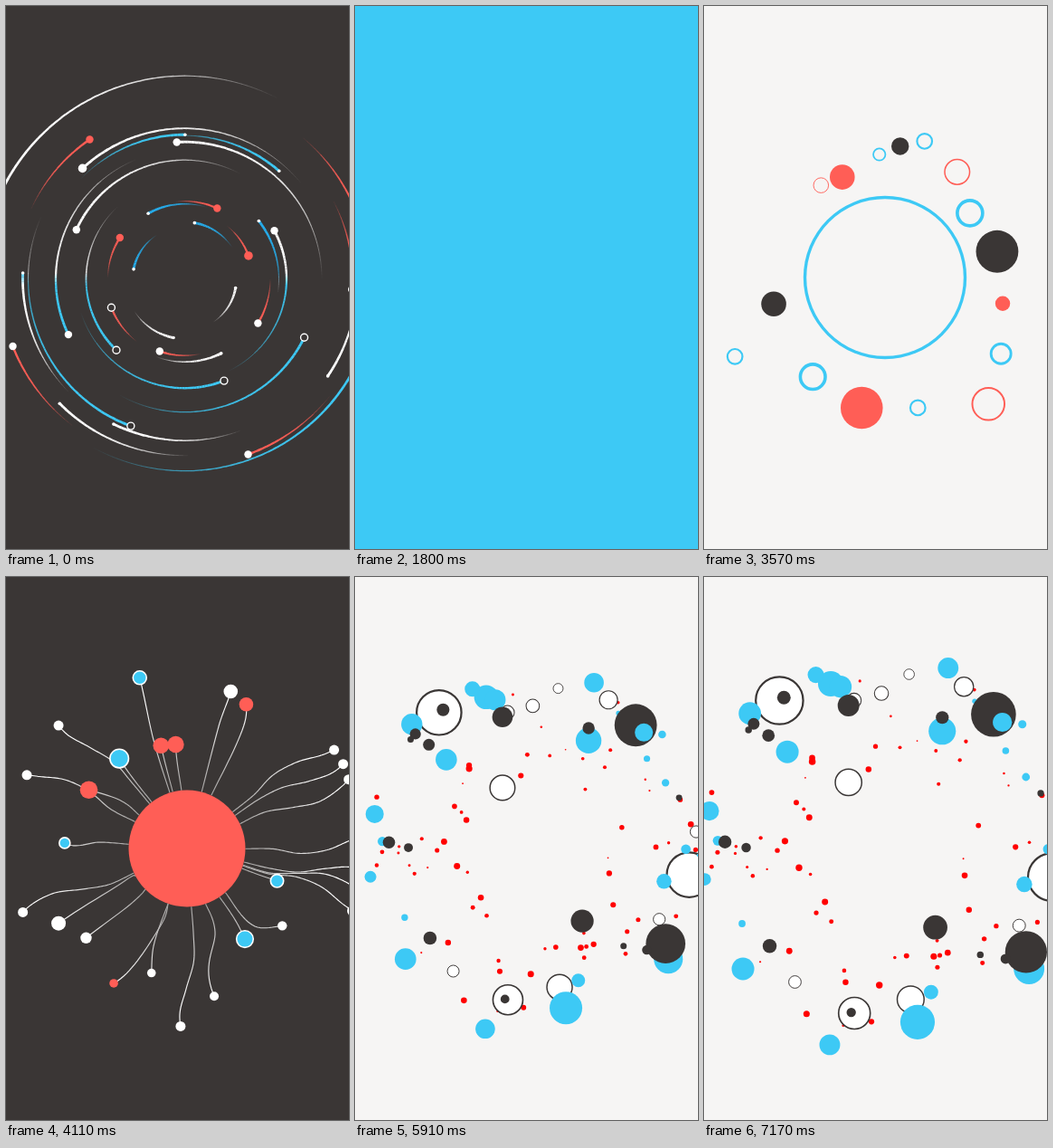
These frames come from a looping animation (379 px wide and 600 px high, 7.2 s). An HTML page with a canvas:

```html
<!DOCTYPE html>
<html lang="en">
<head>
<meta charset="utf-8">
<title>Orbits</title>
<style>
  html, body { margin: 0; width: 100%; height: 100%; overflow: hidden; background: #3a3635; }
  canvas { display: block; width: 379px; height: 600px; }
</style>
</head>
<body>
<canvas id="stage"></canvas>
<script>
const W = 379, H = 600, LOOP = 7200;
const DARK = '#3a3635', LIGHT = '#f6f5f4', BLUE = '#3dc9f5', DEEP = '#25aeee', RED = '#ff5e56', WHITE = '#fff';
const CX = 200, CY = 300, COVER = 365, CORE = 64.5;

const canvas = document.getElementById('stage');
const ctx = canvas.getContext('2d');
const dpr = window.devicePixelRatio || 1;
canvas.width = W * dpr;
canvas.height = H * dpr;
ctx.scale(dpr, dpr);
ctx.lineJoin = 'round';

const rad = deg => deg * Math.PI / 180;
const clamp = v => Math.min(1, Math.max(0, v));
const span = (t, a, b) => clamp((t - a) / (b - a));
const mix = (a, b, u) => a + (b - a) * u;
const polar = (x, y, r, a) => [x + r * Math.cos(a), y + r * Math.sin(a)];
const outQuad = u => 1 - (1 - u) ** 2;
const outCubic = u => 1 - (1 - u) ** 3;
const inCubic = u => u ** 3;
const inOut = u => u * u * (3 - 2 * u);
const outBack = u => 1 + 2.4 * (u - 1) ** 3 + 1.4 * (u - 1) ** 2;

let seed = 11;
const random = (a = 0, b = 1) => {
  seed = seed * 16807 % 2147483647;
  return mix(a, b, seed / 2147483647);
};

function fillAll(color) {
  ctx.fillStyle = color;
  ctx.fillRect(0, 0, W, H);
}

function disc(x, y, r, fill, stroke, width) {
  if (r <= 0) return;
  ctx.beginPath();
  ctx.arc(x, y, r, 0, 7);
  if (fill) { ctx.fillStyle = fill; ctx.fill(); }
  if (stroke) { ctx.strokeStyle = stroke; ctx.lineWidth = width; ctx.stroke(); }
}

/* ---- Orbiting arcs ---- */
const OX = 197.5, OY = 301.7, FAST = 108.4 / 810, SLOW = 92.5 / 810;

function halves(top, bottom) {
  const g = ctx.createLinearGradient(0, OY - 7, 0, OY + 7);
  g.addColorStop(0, top);
  g.addColorStop(1, bottom);
  return g;
}

// Each start is a radius and head angle; every nth head, from the second on, is hollow below the middle.
const orbits = [
  { speed: FAST, trail: -46, width: 2.9, paint: halves(BLUE, WHITE),
    starts: [[159.5, 270], [158.5, 311], [191, 34], [178.5, 116], [195, 135], [179, 182]] },
  { speed: -SLOW, trail: 46, width: 2.9, paint: halves(DEEP, WHITE),
    starts: [[104, 322], [63, 280], [83, 241], [57.5, 191], [66, 101], [91.5, 64], [57, 10]] },
  { speed: -FAST, trail: 93, width: 2.9, paint: halves(WHITE, BLUE), head: WHITE, nth: 2,
    starts: [[224.5, 204], [166.5, 227.4], [151.5, 266.8], [109, 134], [142.5, 154.6], [147, 26.2],
      [131.5, 204.6], [120.5, 69], [112.5, 331.8], [173, 110.3], [212, 25.3]] },
  { speed: FAST, trail: -31, width: 2.5, paint: RED, head: RED, nth: 4,
    starts: [[186.5, 235.6], [185.5, 3.4], [203.5, 341], [206, 70], [204, 158.5], [75, 339.8],
      [94.5, 31], [86, 294.5], [85, 212.4], [87, 158.6], [84.5, 109]] }
];

function tail(r, from, sweep, width, paint) {
  const n = Math.ceil(Math.abs(sweep) / 1.5), step = rad(sweep) / n, start = rad(from);
  ctx.strokeStyle = paint;
  for (let i = 0; i < n; i++) {
    const u = i / n, a = start + i * step, b = a + step * 1.04;
    ctx.globalAlpha = 1 - u ** 3;
    ctx.lineWidth = mix(width, 0.5, u);
    ctx.beginPath();
    ctx.arc(OX, OY, r, Math.min(a, b), Math.max(a, b));
    ctx.stroke();
  }
  ctx.globalAlpha = 1;
}

function head(x, y, color, hollow) {
  if (!color) return disc(x, y, 1.8, WHITE);
  const upper = clamp((OY + 5 - y) / 10);
  if (upper < 1) {
    if (hollow) disc(x, y, 4, DARK, WHITE, 1.4);
    else disc(x, y, 4.2, WHITE);
  }
  ctx.globalAlpha = upper;
  if (upper > 0) disc(x, y, hollow ? 4.8 : 4.2, color);
  ctx.globalAlpha = 1;
}

function drawOrbits(t) {
  fillAll(DARK);
  const heads = [];
  for (const o of orbits) {
    o.starts.forEach(([r, angle], i) => {
      const a = angle + o.speed * t;
      tail(r, a, o.trail, o.width, o.paint);
      heads.push([...polar(OX, OY, r, rad(a)), o.head, i % o.nth === 1]);
    });
  }
  heads.forEach(h => head(...h));
  disc(CX, CY, COVER * inCubic(span(t, 1530, 1790)), BLUE);
}

/* ---- Circles around a ring ---- */
// Places are x, y, radius; line is the stroke relative to the radius, 0 for solid.
const satellites = [
  { color: BLUE, line: 0.26, places: [[194, 164, 6.7], [244, 149.5, 8.3], [294, 229, 14], [328, 384.5, 11],
    [236, 444, 8.3], [120, 409.5, 13.8], [34, 387, 8.3]] },
  { color: RED, line: 0.11, places: [[280, 183.5, 13.8], [314, 440, 17.8], [129.5, 198, 8.3]] },
  { color: RED, line: 0, places: [[330, 329, 8.2], [174, 444, 23.3], [153, 189, 13.8]] },
  { color: DARK, line: 0, places: [[217, 155, 9.7], [324, 271.5, 23.4], [77, 329, 13.8]] }
];

function drawRing(t) {
  fillAll(LIGHT);
  const grow = outCubic(span(t, 1980, 2420));
  const reach = grow * mix(1.25, 1, inOut(span(t, 2420, 3570)));
  const turn = rad(0.11 * (3570 - t));
  for (const { color, line, places } of satellites) {
    for (const [x, y, size] of places) {
      const d = Math.hypot(x - CX, y - CY) * reach, r = size * grow;
      const [px, py] = polar(CX, CY, d, Math.atan2(y - CY, x - CX) + turn);
      if (line) disc(px, py, r, null, color, r * line);
      else disc(px, py, r, color);
    }
  }
  disc(CX, CY, mix(COVER, 90.2, inOut(span(t, 1860, 2160))), BLUE);
  disc(CX, CY, 86.8 * outCubic(span(t, 2080, 2300)), LIGHT);
  disc(CX, CY, COVER * inOut(span(t, 3580, 3740)), DARK);
}

/* ---- Growing strands ---- */
const strands = [];
const strandInk = ctx.createRadialGradient(CX, CY, CORE, CX, CY, 170);
strandInk.addColorStop(0, '#a5a3a2');
strandInk.addColorStop(1, WHITE);

// Smooth curve from the core through the given points, sampled once.
function strand(color, r, ...points) {
  const [x, y] = points[0];
  const p = [polar(CX, CY, CORE, Math.atan2(y - CY, x - CX)), ...points];
  const at = i => p[Math.min(p.length - 1, Math.max(0, i))];
  const spline = (a, b, c, d, u) =>
    b + 0.5 * u * (c - a + u * (2 * a - 5 * b + 4 * c - d + u * (3 * (b - c) + d - a)));
  const path = [];
  let length = 0;
  for (let i = 0; i < p.length - 1; i++) {
    for (let k = 0; k <= 16; k++) {
      const q = [0, 1].map(n => spline(at(i - 1)[n], at(i)[n], at(i + 1)[n], at(i + 2)[n], k / 16));
      const last = path[path.length - 1];
      if (last) length += Math.hypot(q[0] - last.x, q[1] - last.y);
      path.push({ x: q[0], y: q[1], s: length });
    }
  }
  strands.push({ path, length, color, r });
}

// Rippling strands that run off the stage.
[-37, -31, -23, -1, 10, 14, 18, 89, 158, 207, 227].forEach((angle, i) => {
  const points = [];
  for (let d = 95; d < 350; d += 30) points.push(polar(CX, CY, d, rad(angle + 3.5 * Math.sin(d / 26 + i))));
  strand(WHITE, 5.5, ...points);
});

strand(BLUE, 7.5, [163, 180], [140, 85], [101, 11], [129.5, 32]);
strand(RED, 8.8, [171, 185], [161, 127]);
strand(RED, 9.2, [188, 175], [209, 132]);
strand(RED, 7.8, [264, 160], [263, 105], [294, 56], [268, 48]);
strand(WHITE, 7.8, [235, 165], [250, 115], [236, 75], [251, 60], [299, 81]);
strand(BLUE, 7.2, [288, 332], [334, 346], [341.7, 341]);
strand(WHITE, 5.2, [275, 386], [330, 387], [377, 434]);
strand(BLUE, 9.3, [255, 382], [280, 430], [287, 405]);
strand(WHITE, 5, [231, 392], [227, 455], [287, 569]);
strand(WHITE, 4.8, [163, 408], [157, 463], [128, 501], [119.5, 515]);
strand(RED, 4.8, [171, 385], [130, 441], [72, 475], [45, 520], [51, 507]);
strand(WHITE, 6.2, [137, 362], [58, 427], [50, 480]);
strand(WHITE, 8, [128, 338], [27, 411], [42, 479]);
strand(BLUE, 6, [104, 293], [65, 294], [29, 250], [38, 229]);
strand(RED, 9.8, [120, 244], [46, 224], [64.5, 234]);
strand(BLUE, 10.3, [130, 208], [90, 142]);

function drawStrands(t) {
  fillAll(DARK);
  const grown = outQuad(span(t, 3800, 4950)) * (1 - inCubic(span(t, 5260, 5460)));
  const tips = [];
  for (const { path, length, color, r } of strands) {
    const reach = length * grown;
    if (!reach) continue;
    let tip = path[0];
    ctx.strokeStyle = strandInk;
    ctx.lineWidth = 1.15;
    ctx.beginPath();
    for (const q of path) {
      if (q.s > reach) {
        const u = (reach - tip.s) / (q.s - tip.s);
        tip = { x: mix(tip.x, q.x, u), y: mix(tip.y, q.y, u) };
        ctx.lineTo(tip.x, tip.y);
        break;
      }
      ctx.lineTo(q.x, q.y);
      tip = q;
    }
    ctx.stroke();
    tips.push([tip.x, tip.y, r, color, color === BLUE && WHITE, 1.6]);
  }
  tips.forEach(tip => disc(...tip));
  const swell = 1 + 0.15 * Math.sin(Math.PI * span(t, 5260, 5460));
  disc(CX, CY, CORE * swell * outBack(span(t, 3690, 3960)), RED);
}

/* ---- Burst ---- */
// The large circles have set places; the small ones are scattered over a band.
const scatter = (n, near, far, small, large) => Array.from({ length: n }, () =>
  [...polar(CX, CY, random(near, far), random(0, 2 * Math.PI)), random(small, large)]);

const burst = [
  { fill: '#f00', dots: scatter(72, 80, 190, 0.8, 3.6) },
  { fill: WHITE, edge: DARK, dots: [[93, 150, 24.7], [163, 233, 13.8], [280, 136, 10], [369, 329, 24.7],
    [169, 467, 16.5], [226, 453, 14], ...scatter(6, 150, 185, 5, 8)] },
  { fill: BLUE, dots: [[63, 163, 11.7], [145, 133, 13.3], [155, 136, 11.5], [101, 202, 11.8], [264, 117, 10.8],
    [258, 181, 14.2], [346, 422, 16], [22, 262, 10], [56, 422, 11.8], [144, 499, 10.8], [233, 476, 18],
    ...scatter(13, 140, 190, 1.5, 9)] },
  { fill: DARK, dots: [[163, 155, 11.3], [310, 164, 23.4], [343, 405, 21.8], [251, 380, 12.6],
    ...scatter(13, 140, 185, 2.8, 8.5)] },
  { fill: BLUE, dots: [[319, 172, 10]] }
];

function drawBurst(t) {
  if (t < 5580) {
    drawStrands(t);
    disc(CX, CY, COVER * inOut(span(t, 5440, 5570)), LIGHT);
  } else fillAll(LIGHT);
  const out = outCubic(span(t, 5450, 5900));
  const drift = outQuad(span(t, 5900, 7190));
  const reach = out * (1 + 0.09 * drift), scale = out * (1 + 0.06 * drift);
  for (const { fill, edge, dots } of burst) {
    for (const [x, y, r] of dots) {
      disc(mix(CX, x, reach), mix(CY, y, reach), r * scale, fill, edge, 0.5 + r * 0.07);
    }
  }
}

function frame(now) {
  const t = now % LOOP;
  if (t < 1800) drawOrbits(t);
  else if (t < 3750) drawRing(t);
  else if (t < 5440) drawStrands(t);
  else drawBurst(t);
}

const begin = performance.now();
function tick() {
  frame(performance.now() - begin);
  requestAnimationFrame(tick);
}
tick();
</script>
</body>
</html>
```
